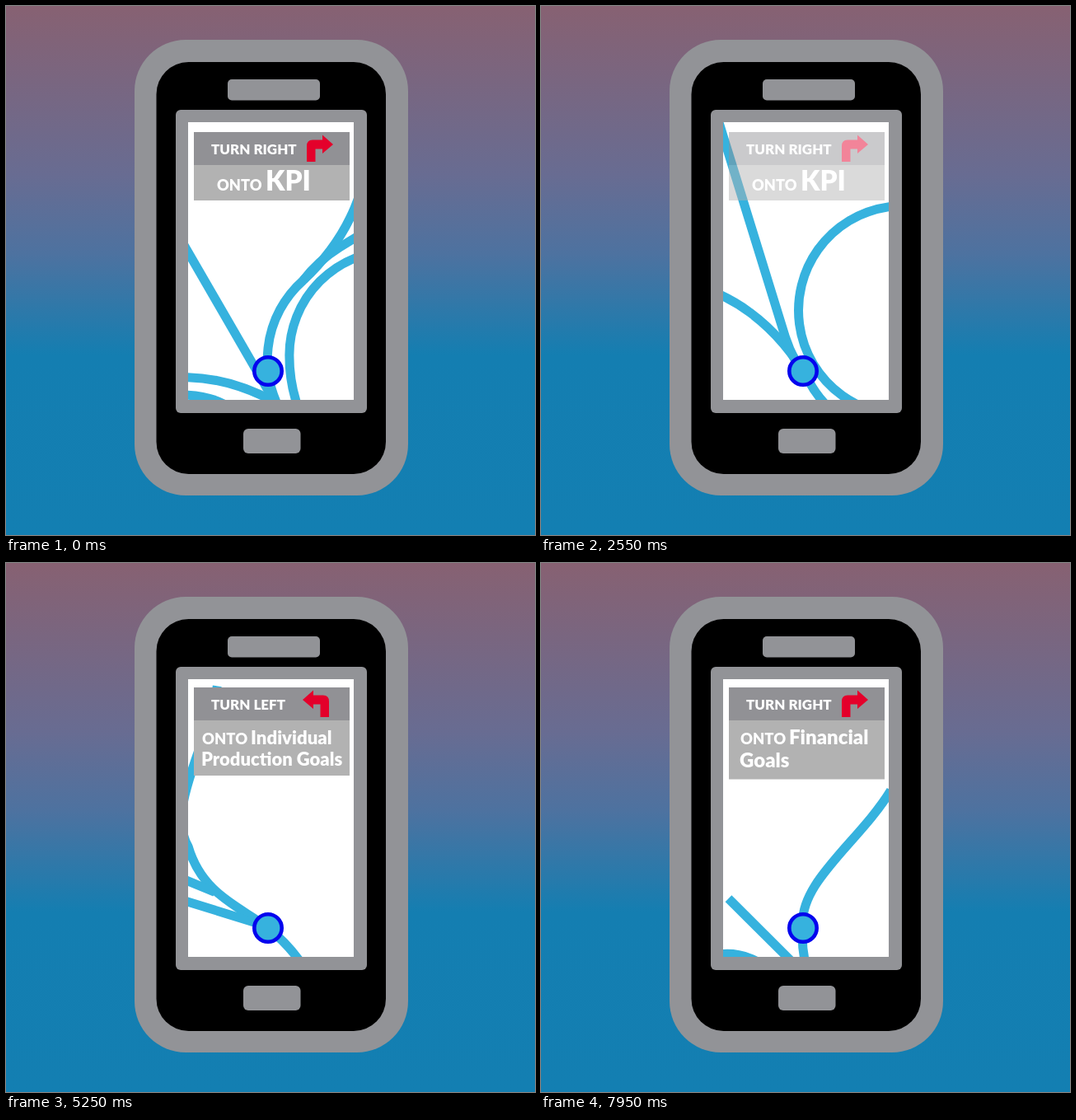
An HTML page for the animation above (8 s loop, 642x642 px).

```html
<!DOCTYPE html>
<html lang="en">
<head>
<meta charset="utf-8">
<title>Road to goals</title>
<style>
  html, body { margin: 0; width: 100%; height: 100%; overflow: hidden; }
  svg { display: block; width: 100%; height: 100%; }
  text { font-family: Lato, sans-serif; font-weight: 900; fill: #fff; }
</style>
</head>
<body>
<svg viewBox="0 0 642 642">
  <defs>
    <linearGradient id="sky" x2="0" y2="1">
      <stop offset="0" stop-color="#876172"/>
      <stop offset=".32" stop-color="#686c92"/>
      <stop offset=".47" stop-color="#4d72a0"/>
      <stop offset=".66" stop-color="#147eb1"/>
      <stop offset="1" stop-color="#137fb2"/>
    </linearGradient>
    <clipPath id="screen"><rect x="221" y="141" width="201" height="337"/></clipPath>
    <path id="arrow" fill="#e4002b" d="M365 187V168Q365 160.500 372 160.500H384V154.500L397 166 384 177V171.500H375.500V187Z"/>
  </defs>

  <rect width="642" height="642" fill="url(#sky)"/>
  <g fill="#929397">
    <rect x="156" y="41" width="332" height="553" rx="62"/>
    <rect x="182.500" y="68" width="278.500" height="500" rx="39" fill="#000"/>
    <rect x="269" y="89" width="112" height="25.500" rx="5"/>
    <rect x="206" y="126" width="232" height="368" rx="6"/>
    <rect x="288" y="513" width="69.500" height="30" rx="6"/>
  </g>

  <g clip-path="url(#screen)">
    <rect x="221" y="141" width="201" height="337" fill="#fff"/>
    <g id="map" fill="none" stroke="#36b2de" stroke-width="11">
      <path id="trunk" d="M340 506A128.400 128.400 0 0 1 359 334C410 286 450 214 433 130C425 90 398 48 423 -8C433 -62 520 -86 576 -134"/>
      <path d="M361 508Q342 470 342 425A127 127 0 0 1 596 425"/>
      <path d="M359 334Q376 311 403 294L651 144"/>
      <path d="M325 483L144 170"/>
      <path d="M180 455Q250 442 325 482M190 474Q235 470 262 484"/>
      <path d="M348 -70L412 55"/>
      <path d="M308 -10Q345 -8 372 31L430 122"/>
    </g>
  </g>

  <g id="signs"></g>
  <circle cx="318" cy="443" r="16.700" fill="#36b2de" stroke="#0404ee" stroke-width="4.600"/>
</svg>
<script>
const $ = id => document.getElementById(id);
const LOOP = 8000, STEP = 50;
const trunk = $('trunk');

const label = (x, y, size, text) => `<text x="${x}" y="${y}" font-size="${size}">${text}</text>`;

// Road sign: turn on the dark strip, destination below
function sign(id, turn, height, body, dy = 0) {
  const flip = turn === 'LEFT' ? 'translate(757) scale(-1 1)' : '';
  return `<g id="${id}" transform="translate(0 ${dy})">
    <rect x="228" y="151" width="189" height="40" fill="#919195"/>
    <rect x="228" y="191" width="189" height="${height}" fill="#b2b2b2"/>
    <use href="#arrow" transform="${flip}"/>
    ${label(249, 178, 17, 'TURN ' + turn)}${body}</g>`;
}

$('signs').innerHTML =
  sign('kpi', 'RIGHT', 43, label(256, 222, 18.2, 'ONTO') + label(315, 222, 33.2, 'KPI'), 2) +
  sign('production', 'LEFT', 67, label(238, 220, 18.4, 'ONTO') +
    label(297, 220, 22.2, 'Individual') + label(237, 246, 22, 'Production Goals')) +
  sign('financial', 'RIGHT', 71.5, label(242, 220, 18.4, 'ONTO') +
    label(301, 220, 24, 'Financial') + label(241, 248, 24, 'Goals'));

const ramp = (t, from, to) => Math.min(1, Math.max(0, (t - from) / (to - from)));

// Distance along the trunk: slow start, steady cruise, gentle slowdown
const travel = t => 67 + 13 * ramp(t, 0, 1000) + 337 * ramp(t, 1000, 5250)
  + 142 * (1 - (1 - ramp(t, 5250, 7950)) ** 1.16);

// Map angle: swings left, then back right
const turn = t => -76 * (1 - (1 - ramp(t, 0, 2550)) ** 1.4)
  + 58 * ramp(t, 2550, 6700) ** 1.13;

function draw(t) {
  const p = trunk.getPointAtLength(travel(t));
  $('map').setAttribute('transform',
    `translate(318 443) rotate(${turn(t)}) translate(${-p.x} ${-p.y})`);
  $('kpi').setAttribute('opacity', 1 - ramp(t, 2300, 2780));
  $('production').setAttribute('opacity', ramp(t, 3000, 3500) - ramp(t, 5350, 5750));
  $('financial').setAttribute('opacity', ramp(t, 5950, 6400));
}

const start = performance.now();
function tick() {
  const t = (performance.now() - start) % LOOP;
  draw(Math.floor(t / STEP) * STEP);
  requestAnimationFrame(tick);
}
tick();
</script>
</body>
</html>
```
